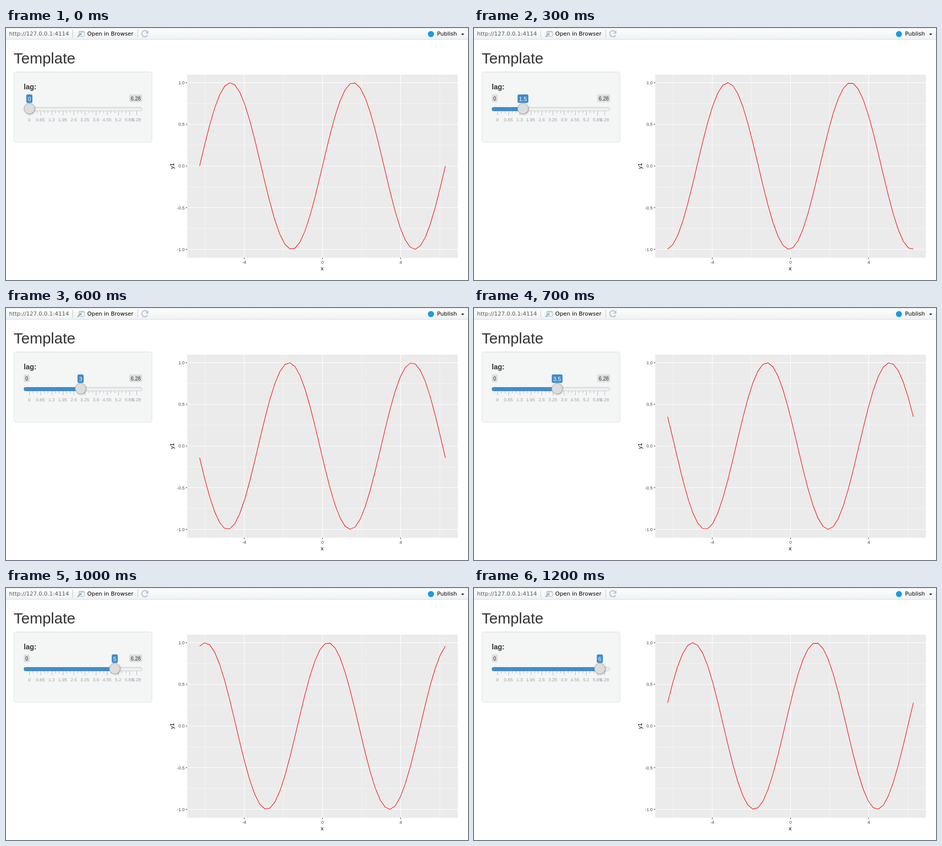
Animation, 910 px wide and 497 px high, one loop 1.3 s. Source, as an HTML page with a canvas:

```html
<!DOCTYPE html>
<html lang="en">
<head>
<meta charset="utf-8">
<title>Lag slider</title>
<style>
html, body { margin: 0; width: 100%; height: 100%; overflow: hidden; background: #fff; }
canvas { display: block; }
</style>
</head>
<body>
<canvas id="stage" width="910" height="497"></canvas>
<script>
const g = document.getElementById('stage').getContext('2d');
const SANS = '"Liberation Sans", Arial, sans-serif';
const UI = '11px "DejaVu Sans", sans-serif';
const STEP_MS = 100, STEPS = 13, MAX = 6.28;
const TRACK = { x: 35, y: 156, w: 233.3, h: 8 };
const PANEL = { x: 357, y: 92, w: 533, h: 361 };

const knobX = v => TRACK.x + 11 + (TRACK.w - 22) * v / MAX;
const plotX = v => 623.4 + 38.52 * v;
const plotY = v => 272.2 - 164.3 * v;

function text(s, x, y, font, color, align = 'left') {
  g.font = font;
  g.fillStyle = color;
  g.textAlign = align;
  g.fillText(s, x, y);
}

function rect(x, y, w, h, color) {
  g.fillStyle = color;
  g.fillRect(x, y, w, h);
}

function box(x, y, w, h, r, fill, stroke) {
  g.beginPath();
  g.roundRect(x, y, w, h, r);
  if (fill) { g.fillStyle = fill; g.fill(); }
  if (stroke) { g.strokeStyle = stroke; g.lineWidth = 1; g.stroke(); }
}

function line(points, color, width) {
  g.beginPath();
  points.forEach(([x, y]) => g.lineTo(x, y));
  g.strokeStyle = color;
  g.lineWidth = width;
  g.stroke();
}

function polygon(points, color) {
  g.beginPath();
  points.forEach(([x, y]) => g.lineTo(x, y));
  g.fillStyle = color;
  g.fill();
}

function fade(y0, y1, from, to) {
  const f = g.createLinearGradient(0, y0, 0, y1);
  f.addColorStop(0, from);
  f.addColorStop(1, to);
  return f;
}

function toolbar() {
  rect(0, 0, 910, 22, fade(0, 22, '#fdfefe', '#eff2f4'));
  rect(0, 0, 910, 1, '#e4e7e9');
  rect(0, 22, 910, 1, '#d9dde0');
  text('http://127.0.0.1:4114', 6, 15, UI, '#5a5a5a');
  text('Open in Browser', 160, 15, UI, '#000');
  text('Publish', 849, 15, UI, '#000');
  for (const x of [131, 259]) rect(x, 3, 1, 16, '#c6cacd');

  // open in a new window
  box(143.5, 6.5, 11, 10, 1, '#f7f9fb', '#a9b4c0');
  rect(144, 7, 10, 2, '#c3cfdb');
  line([[141, 17.5], [146.5, 12]], '#8fb0cf', 2.4);
  polygon([[144, 10.5], [149, 10], [148.5, 15]], '#8fb0cf');

  // refresh
  g.beginPath();
  g.arc(273.5, 11.2, 6, 0.5, 5.6);
  g.strokeStyle = '#b7c3d9';
  g.lineWidth = 2.2;
  g.stroke();
  polygon([[280.5, 4.5], [280.5, 11], [274, 11]], '#b7c3d9');

  g.beginPath();
  g.arc(837, 12, 6, 0, 7);
  g.fillStyle = '#1b9be2';
  g.fill();
  polygon([[896.5, 11], [902.5, 11], [899.5, 14.3]], '#111');
}

function badge(s, x, y, size, fill, color) {
  const w = badgeWidth(s, size);
  box(x, y, w, size * 1.333 + 2, 3, fill);
  text(s, x + 3, y + size * 1.2 - 0.5, `${size}px ${SANS}`, color);
}

function badgeWidth(s, size) {
  g.font = `${size}px ${SANS}`;
  return g.measureText(s).width + 6;
}

function sliderScale() {
  const unit = 0.65;
  for (let i = 0; i <= 10; i++) {
    const v = Math.min(unit * i, MAX), x = knobX(v);
    rect(Math.round(x), 164, 1, 8, 'rgba(66,139,202,.5)');
    text(String(+v.toFixed(2)), x, 184, `9px ${SANS}`, '#99a4ac', 'center');
    if (i < 10) continue;
    for (let k = 1; k < 27; k++)
      if (k % 3) rect(Math.round(knobX(unit * k / 3)), 164, 1, 4, 'rgba(130,130,130,.55)');
  }
}

function slider(lag) {
  const { x, y, w, h } = TRACK, knob = knobX(lag), end = x + w;
  box(15.5, 86.5, 272, 139, 4, '#f4f5f5', '#e1e3e3');
  rect(18, 87, 267, 1, '#ebecec');
  text('lag:', 35, 121, `bold 14px ${SANS}`, '#333', 'left');
  sliderScale();

  box(x + 0.5, y + 0.5, w - 1, h - 1, 4, fade(y, y + h, '#e6e6e6', '#f7f7f7'), '#ccc');
  if (lag) box(x, y, knob - x, h, [4, 0, 0, 4], '#428bca');

  // the end labels give way to the value label
  const value = String(lag), vw = badgeWidth(value, 11), left = knob - vw / 2;
  const minW = badgeWidth('0', 10), maxX = end - badgeWidth('6.28', 10), gap = w / 100;
  if (left > x + minW + gap) badge('0', x, 131, 10, '#dcdddd', '#333');
  if (left + vw < maxX - gap) badge('6.28', maxX, 131, 10, '#dcdddd', '#333');
  badge(value, left, 131, 11, '#428bca', '#fff');

  g.save();
  g.shadowColor = 'rgba(0,0,0,.3)';
  g.shadowBlur = 3;
  g.shadowOffsetX = g.shadowOffsetY = 1;
  box(knob - 10.5, 148.5, 21, 21, 10.5, '#ddd');
  g.restore();
  box(knob - 10.5, 148.5, 21, 21, 10.5, null, '#aaa');
}

function plot(lag) {
  const { x, y, w, h } = PANEL, right = x + w, bottom = y + h;
  const small = `8.8px ${SANS}`, ink = '#4d4d4d';
  const vertical = (v, width) => line([[plotX(v), y], [plotX(v), bottom]], '#fff', width);
  const horizontal = (v, width) => line([[x, plotY(v)], [right, plotY(v)]], '#fff', width);

  rect(x, y, w, h, '#ebebeb');
  for (const v of [-6, -2, 2, 6]) vertical(v, 0.53);
  for (const v of [-0.75, -0.25, 0.25, 0.75]) horizontal(v, 0.53);
  for (const v of [-4, 0, 4]) {
    vertical(v, 1.07);
    line([[plotX(v), bottom], [plotX(v), bottom + 2.7]], '#333', 1.07);
    text(String(v), plotX(v), 465, small, ink, 'center');
  }
  for (const v of [-1, -0.5, 0, 0.5, 1]) {
    horizontal(v, 1.07);
    line([[x - 2.7, plotY(v)], [x, plotY(v)]], '#333', 1.07);
    text(v.toFixed(1), 352, plotY(v) + 3.2, small, ink, 'right');
  }

  text('x', 622.8, 478, `11px ${SANS}`, '#000', 'center');
  g.save();
  g.translate(331, 272.3);
  g.rotate(-Math.PI / 2);
  text('y1', 0, 0, `11px ${SANS}`, '#000', 'center');
  g.restore();

  const curve = Array.from({ length: 50 }, (_, i) => {
    const v = Math.PI * (4 * i / 49 - 2);
    return [plotX(v), plotY(Math.sin(v - lag))];
  });
  line(curve, '#f00', 1.07);
}

function draw(now) {
  const lag = Math.floor(now / STEP_MS) % STEPS / 2;
  rect(0, 0, 910, 497, '#fff');
  toolbar();
  text('Template', 15, 70, `30px ${SANS}`, '#333');
  slider(lag);
  plot(lag);
}

const start = performance.now();
function tick() {
  draw(performance.now() - start);
  requestAnimationFrame(tick);
}
tick();
</script>
</body>
</html>
```
